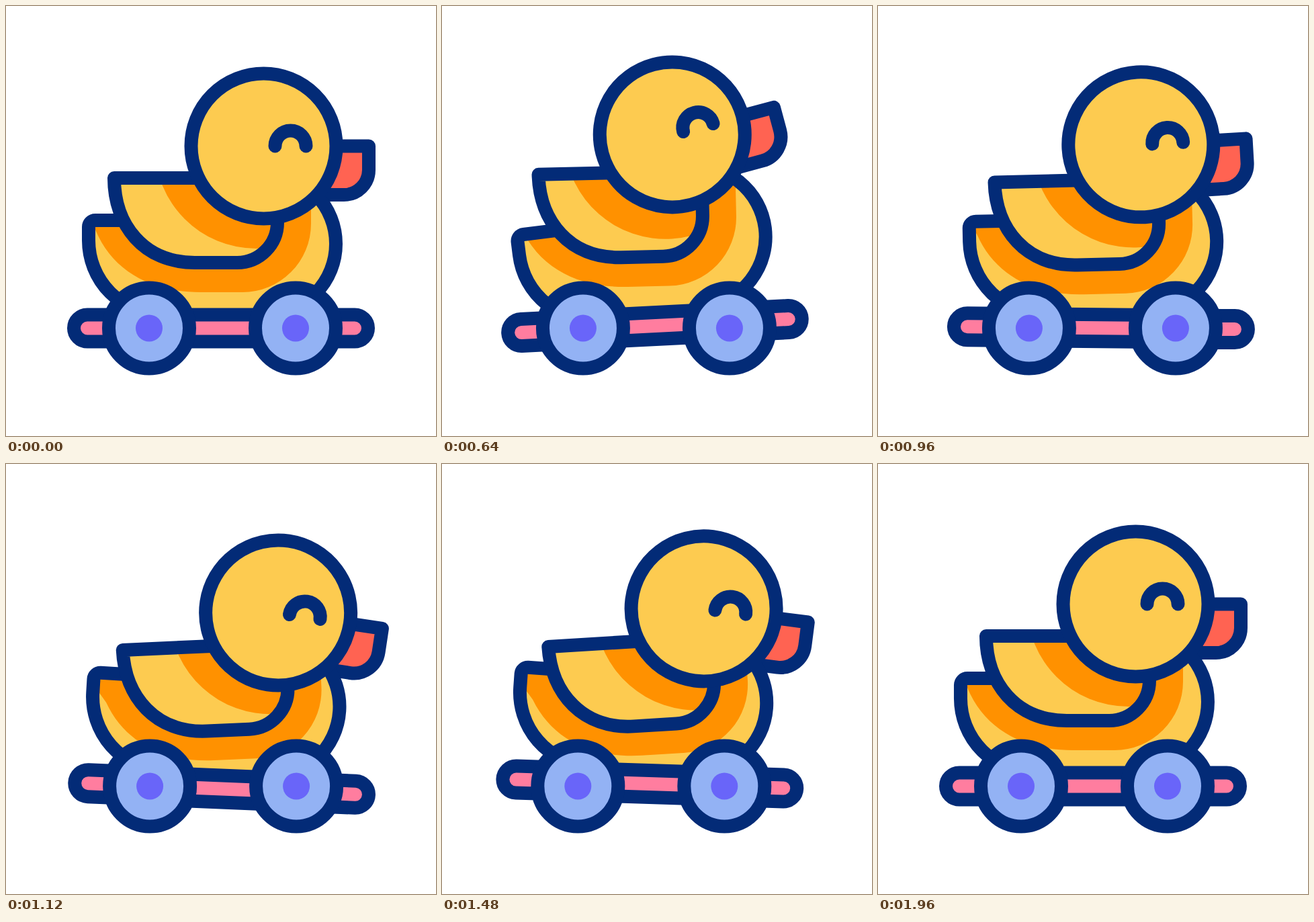
Animation, 640 px wide and 640 px high, one loop 2000 ms. Source, as an HTML page:

```html
<!DOCTYPE html>
<html lang="en">
<head>
<meta charset="utf-8">
<title>Rolling toy duck</title>
<style>
  html, body { margin: 0; width: 100%; height: 100%; overflow: hidden; background: #fff; }
  svg { display: block; width: 100vw; height: 100vh; }

  @property --x { syntax: "<number>"; inherits: false; initial-value: 0; }
  @property --y { syntax: "<number>"; inherits: false; initial-value: 0; }
  @property --r { syntax: "<number>"; inherits: false; initial-value: 0; }

  .ride, .bounce, .bar, .body, .wing, .head {
    transform: translate(calc(var(--x) * 1px), calc(var(--y) * 1px)) rotate(calc(var(--r) * 1deg));
    animation: 2s cubic-bezier(.364, 0, .636, 1) infinite;
  }
  .ride { animation-name: ride-x; }
  .bounce { animation-name: bounce-y; }
  .bar { transform-origin: 320px 479.5px; animation-name: bar-r; }
  .body { transform-origin: 322px 405px; animation-name: body-xy, body-r; }
  .wing { transform-origin: 290px 320px; animation-name: wing-x, wing-y, wing-r; }
  .head { transform-origin: 383.5px 208.5px; animation-name: head-x, head-y, head-r; }

  /* the whole toy rolls back and forth and hops */
  @keyframes ride-x {
    0%, 90%, 100% { --x: 0; }
    22.5% { --x: -13; }
    45% { --x: 13; }
    68.25% { --x: -12.8; }
  }
  @keyframes bounce-y {
    0%, 97.5%, 100% { --y: 0; }
    15.5% { --y: 5.6; }
    38.5% { --y: -5.5; }
    56.5% { --y: 4; }
    81% { --y: -5.2; }
  }

  /* each part sways a little later than the one below it */
  @keyframes bar-r {
    0%, 88%, 100% { --r: 0; }
    28.75% { --r: -3; }
    63.5% { --r: 3.05; }
  }
  @keyframes body-xy {
    0%, 100% { --x: 0; --y: 0; }
    16% { --x: -.6; --y: -.5; }
    32% { --x: .5; --y: .5; }
    48% { --x: 2.3; --y: -1.8; }
    64% { --x: .5; --y: -.2; }
    82% { --x: -1.3; --y: 1; }
  }
  @keyframes body-r {
    0%, 94.5%, 100% { --r: 0; }
    33% { --r: -7.1; }
    64% { --r: 5.4; }
  }
  @keyframes wing-x {
    0%, 94%, 100% { --x: 0; }
    34.5% { --x: -13.2; }
    61.5% { --x: 17.3; }
  }
  @keyframes wing-y {
    0%, 95%, 100% { --y: 0; }
    34.5% { --y: -4.6; }
    64.5% { --y: 14.7; }
  }
  @keyframes wing-r {
    0%, 100% { --r: 0; }
    16% { --r: -1.6; }
    42% { --r: -1.1; }
    69% { --r: -3.8; }
  }
  @keyframes head-x {
    0%, 93.5%, 100% { --x: 0; }
    34% { --x: -38; }
    61% { --x: 25.7; }
  }
  @keyframes head-y {
    0%, 95%, 100% { --y: 0; }
    34.5% { --y: -13.8; }
    64% { --y: 13.6; }
  }
  @keyframes head-r {
    0%, 95%, 100% { --r: 0; }
    36.5% { --r: -15.6; }
    60.75% { --r: 11; }
  }

  .line { stroke: #032b77; stroke-width: 20; stroke-linecap: round; stroke-linejoin: round; }
  .open { fill: none; }
  .yellow { fill: #fdcb50; }
  .shade { fill: #ff9100; }
  .red { fill: #ff6352; }
  .pink { fill: #ff7d9f; }
  .tire { fill: #93b2f4; }
  .hub { fill: #6965f9; }
</style>
</head>
<body>
<svg viewBox="0 0 640 640">
  <defs>
    <path id="hull" d="M300 319H133A10 10 0 0 0 123 329V349A110 110 0 0 0 233 459H386A105 105 0 0 0 386 249Z"/>
    <path id="flap" d="M161 256C161 326 205 382 281 382H344A60 60 0 0 0 404 322V256Z"/>
    <g id="wheel">
      <circle class="line tire" r="60"/>
      <circle class="hub" r="20"/>
    </g>
    <clipPath id="in-body"><use href="#hull" class="body"/></clipPath>
    <clipPath id="in-wing"><use href="#flap" class="wing"/></clipPath>
  </defs>

  <g class="ride">
    <g class="bounce">
      <path class="head line red" d="M470 208.5H540V244A37 37 0 0 1 503 281H462Z"/>

      <use href="#hull" class="body yellow"/>
      <g clip-path="url(#in-body)">
        <path class="wing shade" d="M115 240V305L133 333C159 396 218 426 290 426H352A102 102 0 0 0 454 324V240Z"/>
      </g>
      <!-- the hull has no outline along the bar -->
      <path class="body line open" d="M300 319H133A10 10 0 0 0 123 329V349A110 110 0 0 0 233 459M386 459A105 105 0 0 0 386 249"/>

      <use href="#flap" class="wing yellow"/>
      <g clip-path="url(#in-wing)">
        <circle class="head shade" cx="372" cy="211" r="150"/>
      </g>
      <use href="#flap" class="wing line open"/>

      <g class="head">
        <circle class="line yellow" cx="383.5" cy="208.5" r="108"/>
        <path class="line open" d="M400.5 208.5a23 23 0 0 1 46 0"/>
      </g>

      <rect class="bar line pink" x="101" y="459.5" width="438" height="40" rx="20"/>
    </g>
    <use href="#wheel" x="213" y="479.5"/>
    <use href="#wheel" x="431" y="479.5"/>
  </g>
</svg>
</body>
</html>
```
